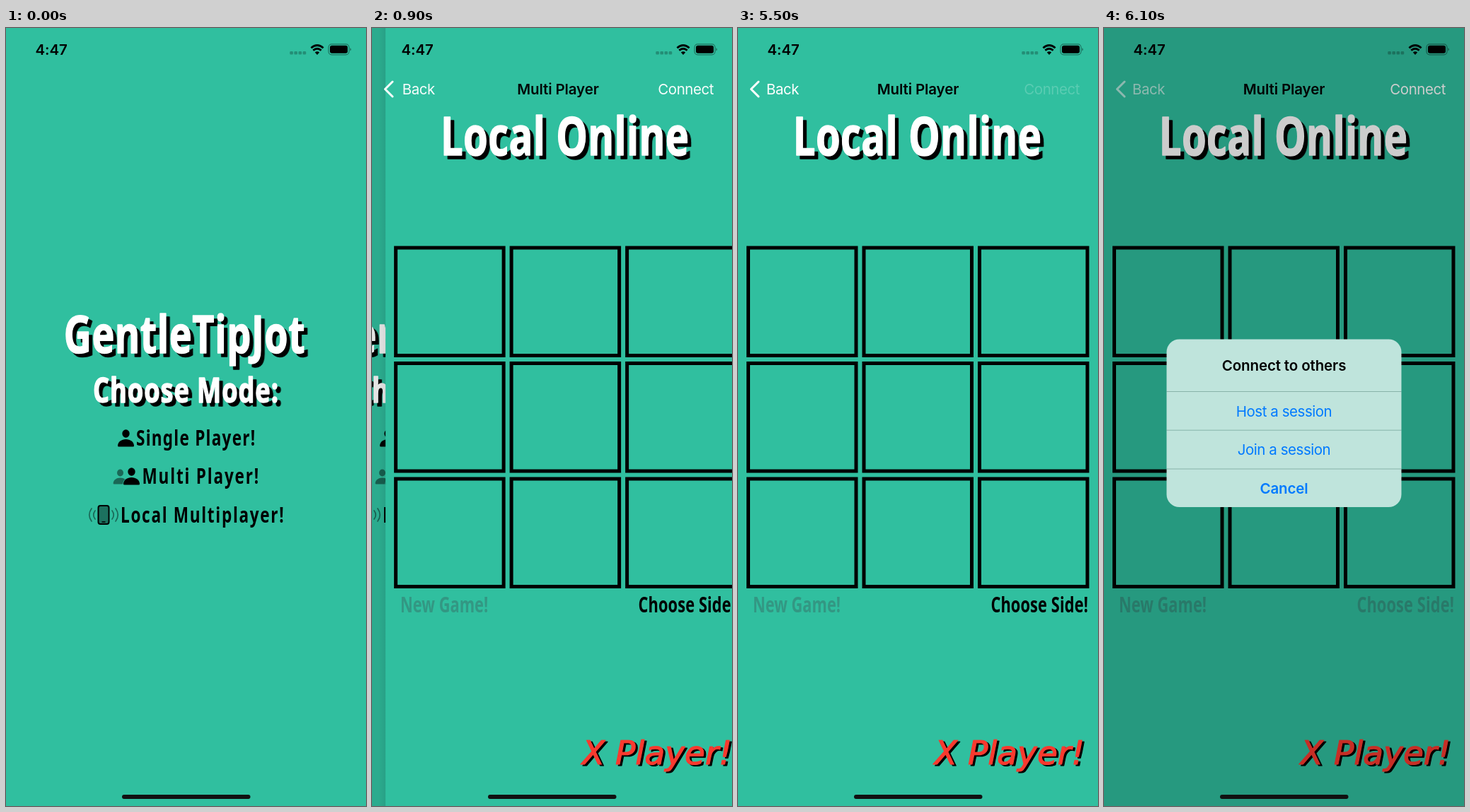
An HTML page for the animation above (8000 ms loop, 509 by 1101 pixels).

```html
<!DOCTYPE html>
<html lang="en">
<head>
<meta charset="utf-8">
<title>Board game menu</title>
<style>
  html, body { margin: 0; width: 100%; height: 100%; overflow: hidden; background: #30bf9f; }
  svg { display: block; width: 100%; height: 100%; }
  text { white-space: pre; }
  .ui { font: 400 20.5px Inter, Roboto, sans-serif; letter-spacing: -.022em; }
  .bold { font-weight: 600; letter-spacing: -.006em; }
  .marker { font-family: "Noto Sans", "Open Sans", sans-serif; font-weight: 700; }
  .title {
    fill: #fff; stroke: #fff; stroke-width: 1.6; stroke-linejoin: round;
    filter: drop-shadow(7.5px 5px 0 #000);
  }
  .chalk {
    font: italic 400 47px "DejaVu Sans", sans-serif;
    fill: #f93a2f; stroke: #f93a2f; stroke-width: 1.2; stroke-linejoin: round;
    filter: drop-shadow(3px 2px 0 #000);
  }
</style>
</head>
<body>
<svg id="stage" viewBox="0 0 509 1101" preserveAspectRatio="none">
  <defs>
    <linearGradient id="fade" gradientUnits="userSpaceOnUse" x1="372" x2="402" y1="0" y2="0">
      <stop stop-color="#000"/><stop offset="1" stop-color="#000" stop-opacity="0"/>
    </linearGradient>
    <linearGradient id="edge">
      <stop stop-opacity="0"/><stop offset="1" stop-opacity=".06"/>
    </linearGradient>
    <path id="body" d="M-11.5 17.5C-11.5 11.5-6 8-0 8S11.5 11.5 11.5 17.5Q11.5 18.5 10 18.5H-10Q-11.5 18.5-11.5 17.5Z"/>
    <g id="person"><ellipse rx="5.2" ry="5.7"/><use href="#body"/></g>
  </defs>

  <g id="menu">
    <rect width="700" height="1101" fill="#30bf9f"/>
    <use href="#person" x="169.5" y="574"/>
    <use href="#person" transform="translate(161.5 629.5) scale(.86)" opacity=".45"/>
    <use href="#person" x="177.5" y="628" stroke="#30bf9f" stroke-width="1.5" paint-order="stroke"/>
    <g id="local">
      <rect x="130.5" y="676" width="15" height="26" rx="3" fill-opacity=".4" stroke="#000" stroke-width="2"/>
      <path d="M135.5 699H140.5" stroke="#000" stroke-width="1.5"/>
      <path d="M126 683Q121.500 689 126 695M121 680Q114.500 689 121 698M150 683Q154.500 689 150 695M155 680Q161.500 689 155 698"
        fill="none" stroke="#000" stroke-opacity=".45" stroke-width="1.7" stroke-linecap="round"/>
    </g>
  </g>
  <rect id="menuDim" width="509" height="1101"/>

  <g id="game">
    <rect x="-10" width="10" height="1101" fill="url(#edge)"/>
    <rect width="509" height="1101" fill="#30bf9f"/>
    <g id="board" fill="none" stroke="#000" stroke-width="5"/>
    <text class="chalk" x="490" y="1042" text-anchor="end">X Player!</text>
  </g>

  <g id="nav" class="ui" fill="#fff">
    <g id="back">
      <path d="M29 76L18.500 86.500L29 97" fill="none" stroke="#fff" stroke-width="3" stroke-linecap="round" stroke-linejoin="round"/>
      <text id="backText" x="40" y="93.500">Back</text>
    </g>
    <text id="navTitle" class="bold" y="93.500" text-anchor="middle" fill="url(#fade)">Multi Player</text>
    <text id="connect" x="483" y="93.500" text-anchor="end">Connect</text>
  </g>

  <rect id="dim" width="509" height="1101"/>

  <g id="status">
    <text class="ui bold" x="41.500" y="37.500">4:47</text>
    <g id="dots" opacity=".25"/>
    <path d="M440 38L436.800 34.500Q440 31.800 443.200 34.500Z"/>
    <path d="M434.300 31.600Q440 26.800 445.700 31.600M431.400 28.300Q440 20.800 448.600 28.300" fill="none" stroke="#000" stroke-width="2.8"/>
    <rect x="456" y="22.800" width="29" height="15" rx="4.500" fill="none" stroke="#000" stroke-opacity=".4" stroke-width="1.2"/>
    <rect x="458" y="24.800" width="25" height="11" rx="2.800"/>
    <path d="M486.500 28Q489.500 30.300 486.500 32.600Z" fill-opacity=".45"/>
  </g>

  <g id="alert" class="ui" text-anchor="middle" fill="#007aff">
    <rect x="88.500" y="440.500" width="332" height="237.500" rx="18" fill="#bfe4dc"/>
    <path d="M88.500 514.500h332M88.500 569.200h332M88.500 624h332" stroke="#1f5548" stroke-opacity=".35"/>
    <text class="bold" x="254.500" y="485" fill="#000">Connect to others</text>
    <text x="254.500" y="549.500">Host a session</text>
    <text x="254.500" y="604">Join a session</text>
    <text class="bold" x="254.500" y="658.500">Cancel</text>
  </g>
  <rect x="164" y="1085" width="181.500" height="6" rx="3" fill="#111"/>
</svg>
<script>
const LOOP = 8000, W = 509;
const NARROW = .74; // the marker face is a condensed one
const $ = id => document.getElementById(id);

function add(parent, tag, attrs) {
  const el = document.createElementNS("http://www.w3.org/2000/svg", tag);
  for (const key in attrs) el.setAttribute(key, attrs[key]);
  return parent.appendChild(el);
}

function marker(parent, text, x, y, size, { anchor = "start", gap = 0, title = false } = {}) {
  const el = add($(parent), "text", {
    class: "marker" + (title ? " title" : ""),
    transform: `translate(${x} ${y}) scale(${NARROW} 1)`,
    "font-size": size, "letter-spacing": gap * size, "text-anchor": anchor
  });
  el.textContent = text;
  return el;
}

const heading = { anchor: "middle", title: true };
marker("menu", "GentleTipJot", 252.5, 460, 73, { ...heading, gap: .01 });
marker("menu", "Choose Mode:", 254.5, 529.5, 49, { ...heading, gap: .025 });
marker("menu", "Single Player!", 184, 591, 30.5, { gap: .055 });
marker("menu", "Multi Player!", 192.5, 645, 30.5, { gap: .08 });
marker("local", "Local Multiplayer!", 162, 699.5, 30.5, { gap: .075 });
marker("game", "Local Online", 253.5, 180, 76, { ...heading, gap: .006 });
const newGame = marker("game", "New Game!", 21, 826.5, 29.5);
newGame.setAttribute("fill", "rgba(60,60,67,.3)");
const side = marker("game", "Choose Side!", 495, 826.5, 29.5, { anchor: "end", gap: .005 });

for (let i = 0; i < 9; i++) {
  add($("board"), "rect", {
    x: 14.5 + 163.5 * (i % 3), y: 311 + 163.5 * Math.floor(i / 3), width: 152.5, height: 152.5
  });
}
for (let i = 0; i < 4; i++) {
  add($("dots"), "rect", { x: 401.3 + 6.1 * i, y: 33, width: 4.6, height: 4.6, rx: 1.3 });
}

// Critically damped spring from 0 to 1; ms counts from its start.
function spring(ms) {
  if (ms <= 0) return 0;
  const x = ms * .0159, p = 1 - (1 + x) * Math.exp(-x);
  return p > .995 ? 1 : p;
}

// The picture advances every 200 ms after the first half second.
const tick = t => t < 500 ? 0 : 500 + 200 * Math.floor((t - 500) / 200);

function draw(time) {
  const t = tick(time);
  const push = spring(t - 580), open = spring(t - 5552);
  const rest = 1 - push;

  $("menu").setAttribute("transform", `translate(${-.3 * W * push})`);
  $("menuDim").setAttribute("opacity", .11 * push);
  $("game").setAttribute("transform", `translate(${W * rest})`);
  $("game").setAttribute("visibility", push > 0 ? "visible" : "hidden");
  $("local").setAttribute("opacity", t === 500 ? .35 : 1);

  $("nav").setAttribute("opacity", push);
  $("backText").setAttribute("x", 40 + 72 * rest);
  $("navTitle").setAttribute("x", 254.5 + 226 * rest);
  $("back").setAttribute("opacity", 1 - .38 * open * open);
  $("connect").setAttribute("opacity", t < 5500 ? 1 : .2 + .8 * open * open);

  const gray = 60 * open;
  side.setAttribute("fill", `rgba(${gray},${gray},${gray * 1.1},${1 - .7 * open})`);
  $("dim").setAttribute("opacity", .2 * open);
  $("alert").setAttribute("opacity", open);
  $("alert").setAttribute("transform",
    `translate(254.5 559.3) scale(${1.2 - .2 * open}) translate(-254.5 -559.3)`);
}

const start = performance.now();
function run(now) {
  draw(Math.max(0, now - start) % LOOP);
  requestAnimationFrame(run);
}
draw(0);
requestAnimationFrame(run);
</script>
</body>
</html>
```
